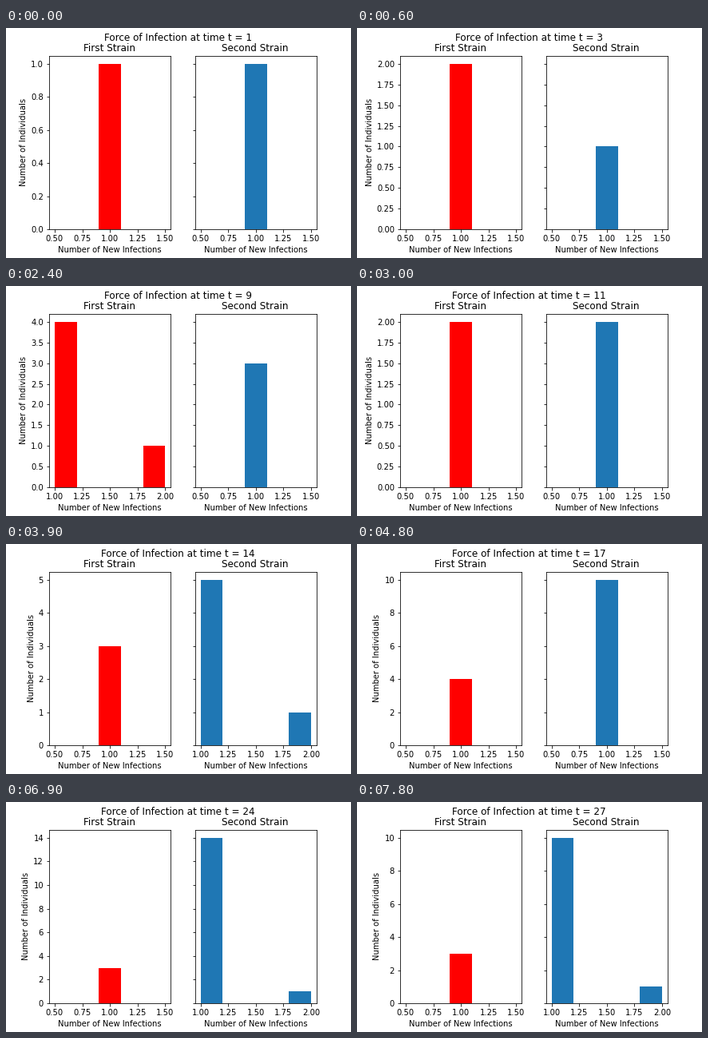
Write a matplotlib script that moves like this. It is 432 px wide and 288 px high and loops after 8000 ms.

```python
import matplotlib.pyplot as plt
import numpy as np
from matplotlib.animation import FuncAnimation

STEP_MS, TICK_MS, LOOP_MS = 300, 100, 8000

plt.rcParams.update({
    "font.family": "DejaVu Sans",
    "font.size": 10,
    "figure.subplot.bottom": 0.125,
})

# Key points of the epidemic; counts between them follow straight lines
KEY_TIMES = [1, 6, 9, 11, 14, 17, 22, 27]
FIRST = {1: [1, 5, 4, 2, 3, 4, 4, 3], 2: [0, 1, 1, 0, 0, 0, 0, 0]}
SECOND = {1: [1, 3, 3, 2, 5, 10, 17, 10], 2: [0, 0, 0, 0, 1, 0, 2, 1]}

fig, (left, right) = plt.subplots(1, 2, sharey=True, figsize=(6, 4), dpi=72)
heading = fig.suptitle("", x=0.498, fontsize=12)


def infections(strain, t):
    """One entry per individual: how many new infections they cause."""
    counts = [int(np.interp(t, KEY_TIMES, levels)) for levels in strain.values()]
    return np.repeat(list(strain), counts)


def draw_strain(ax, data, title, color):
    ax.clear()
    ax.hist(data, bins=5, color=color)
    ax.set_title(title, x=0.496, fontsize=12)
    ax.set_xlabel("Number of New Infections")


def update(i):
    t = i * TICK_MS // STEP_MS + 1
    draw_strain(left, infections(FIRST, t), "First Strain", "red")
    draw_strain(right, infections(SECOND, t), "Second Strain", "tab:blue")
    left.set_ylabel("Number of Individuals")
    right.tick_params(labelleft=False)
    # Both panels share one y axis, so rescale it to the taller bar
    left.relim()
    left.autoscale(axis="y")
    heading.set_text(f"Force of Infection at time t = {t}")
    return []


anim = FuncAnimation(fig, update, frames=LOOP_MS // TICK_MS, interval=TICK_MS,
                     init_func=lambda: [], repeat=True, repeat_delay=0)
plt.show()
```
